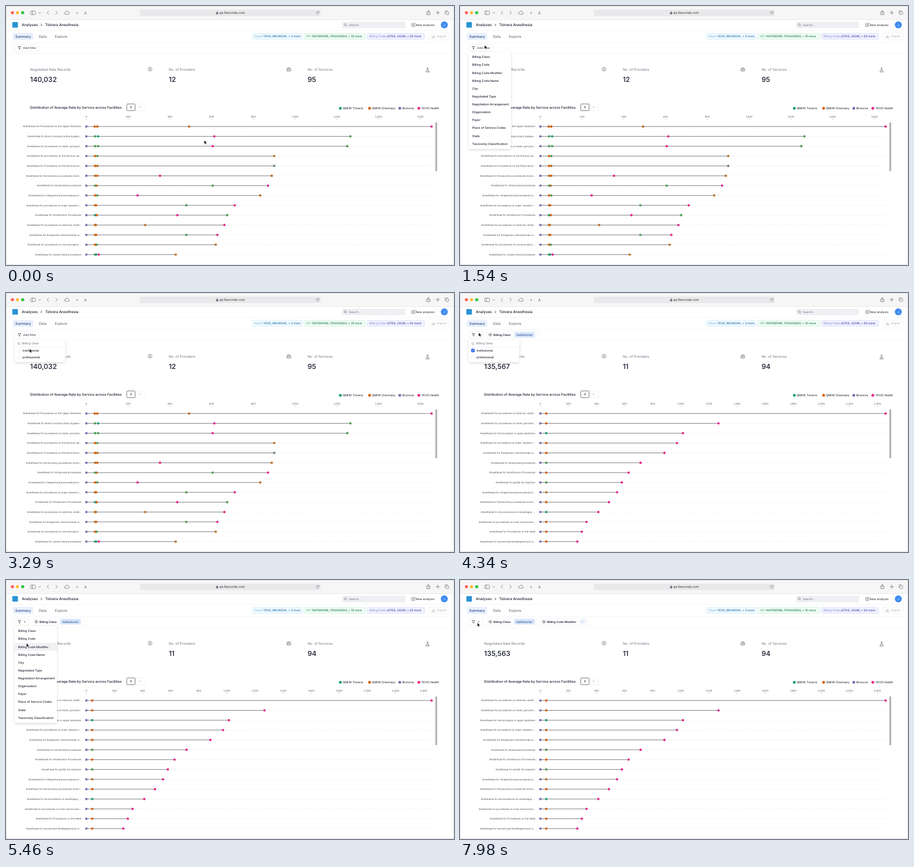
An HTML page for the animation above (8000 ms loop, 800 px wide and 464 px high).

```html
<!DOCTYPE html>
<html lang="en">
<head>
<meta charset="utf-8">
<title>Rate analysis</title>
<style>
html, body { margin: 0; width: 100%; height: 100%; overflow: hidden; background: #eee; }
svg { display: block; width: 800px; height: 464px; font-family: Inter, "Open Sans", sans-serif; text-rendering: geometricPrecision; }
</style>
</head>
<body>
<svg viewBox="0 0 800 464">
  <defs><filter id="shadow" x="-20%" y="-20%" width="140%" height="140%">
    <feDropShadow dx="0" dy="1.5" stdDeviation="2" flood-opacity=".16"/>
  </filter></defs>
  <g id="scene"></g>
  <path id="cursor" d="M0 0V6.8L1.6 5.4L2.7 7.8L3.8 7.3L2.8 5H5Z" fill="#000" stroke="#fff" stroke-width=".5"/>
</svg>
<script>
const LOOP = 8000;
const INK = '#151a2b', GREY = '#6b7280', PALE = '#e9eaee', ICON = '#666b75';
const COLORS = { g: '#1b9e77', o: '#d95f02', p: '#7570b3', k: '#e7298a', b: '#b8722c', l: '#4f9d58', x: '#6f8a78' };

// Drawing helpers; text is centred vertically on y.
const text = (x, y, s, size, fill = INK, weight = 400, anchor = 'start') =>
  `<text x="${x}" y="${y + size * .36}" font-size="${size}" fill="${fill}" font-weight="${weight}" text-anchor="${anchor}">${s}</text>`;
const rect = (x, y, w, h, fill, r = 0, stroke = 'none', extra = '') =>
  `<rect x="${x}" y="${y}" width="${w}" height="${h}" rx="${r}" fill="${fill}" stroke="${stroke}" stroke-width=".7" ${extra}/>`;
const path = (d, stroke = ICON, w = .8, extra = '') =>
  `<path d="${d}" fill="none" stroke="${stroke}" stroke-width="${w}" stroke-linecap="round" stroke-linejoin="round" ${extra}/>`;
const dot = (x, y, r, fill, stroke = 'none') =>
  `<circle cx="${x}" cy="${y}" r="${r}" fill="${fill}" stroke="${stroke}" stroke-width=".7"/>`;

// Each row: label | marks as colour letter + x position.
const parse = rows => rows.map(row => {
  const [label, marks] = row.split('|');
  return { label: 'Anesthesia for ' + label, marks: marks.split(' ').map(m => [m[0], +m.slice(1)]) };
});
const ALL = {
  step: 74.55, ticks: 9,
  rows: parse([
    'Procedures on the Upper Abdomen|o158.5 o163 b327 k760',
    'direct coronary artery bypass...|l159 g164.5 k372 l615',
    'procedures on heart, pericard...|l159 l164.5 k369 l609.5',
    'procedures on the thoracic sp...|o159 l163 b479',
    'Procedures on the Pelvis Exce...|o159 b163 x479',
    'thoracotomy procedures involv...|b159 o163 k275 b474.5',
    'intracranial procedures|l159 b162 l369 k468',
    'intraperitoneal procedures in...|o159 l163 k235 b454',
    'procedures on major vessels o...|b159 o161 l322 k408.5',
    'Intrathoracic Procedures|g159 o162 k306 l395',
    'procedures on external, middl...|o159 b160.5 b248.5 k390',
    'therapeutic interventional ra...|b159 o161 l322 k377.5',
    'procedures on cervical spine ...|o159 l162 b374.5',
    'closed chest procedures|l159 g161 k165.5 b303'])
};
const FILTERED = {
  step: 50.18, ticks: 13,
  rows: parse([
    'procedures on external, middl...|o154 k760',
    'procedures on heart, pericard...|o154 k461.5',
    'hernia repairs in upper abdomen|g154 k398',
    'procedures on major vessels o...|o154 k387.5',
    'therapeutic interventional ra...|o154 k365',
    'intracranial procedures|l154 k322.5',
    'Intrathoracic Procedures|o154 k301',
    'partial rib resection|l154 k289',
    'intraperitoneal procedures in...|b154 k280.5',
    'thoracotomy procedures involv...|o154 k266',
    'all procedures on esophagus, ...|g154 k247',
    'procedures on nose and access...|o154 k226',
    'Procedures on the Head|o154 k217.5',
    'second and thirddegree burn e...|o154 k209.5'])
};
const MENU = ['Billing Class', 'Billing Code', 'Billing Code Modifier', 'Billing Code Name', 'City', 'Negotiated Type',
  'Negotiation Arrangement', 'Organization', 'Payer', 'Place of Service Codes', 'State', 'Taxonomy Classification'];
const MENU_TOP = 84.3, MENU_STEP = 14.13;

function browserBar() {
  return rect(.5, .5, 799, 463, '#fff', 6, '#d4d4d6') +
    '<path d="M.8 24.5V7Q.8.8 7 .8H793Q799.2.8 799.2 7V24.5Z" fill="#f7f6f7"/>' +
    path('M.8 24.5H799.2', '#e4e4e6', .7) +
    dot(11.5, 12, 2.8, '#ff5f57') + dot(20.6, 12, 2.8, '#febc2e') + dot(29.8, 12, 2.8, '#28c840') +
    rect(44, 9, 8.5, 6.5, 'none', 1.3, ICON) + path('M47 9V15.5M58.5 11.5L60.2 13.2L61.9 11.5') +
    path('M76.3 9L73.3 12L76.3 15M88.8 9L91.8 12L88.8 15') +
    path('M106 14.8Q103.8 14.6 104.2 12.6Q104.8 11.2 106.2 11.4Q107 8.8 109.4 9.2Q111.6 9.6 111.8 11.5Q113.4 11.8 113.3 13.3Q113 14.8 111.5 14.8Z') +
    text(127, 12.3, 'A', 4.5, ICON, 500, 'middle') + text(142, 12, 'A', 7, ICON, 400, 'middle') +
    rect(239, 6.5, 323, 11.5, '#e9e8ea', 3) +
    rect(375.2, 11.5, 3.8, 3.3, ICON, .6) + path('M376 11.5V10.5Q377.1 8.7 378.2 10.5V11.5', ICON, .6) +
    text(381, 12.3, 'qa.feecorda.com', 5.7, '#333') +
    path('M558.6 11.2A2.4 2.4 0 1 0 558.8 13M558.8 9.6V11.3H557', ICON, .6) +
    path('M752.8 11H751.4V15.6H757V11H755.6M754.2 13V8.2M752.7 9.6L754.2 8.1L755.7 9.6') +
    path('M768 12H774M771 9V15') +
    rect(785.6, 10.4, 5, 5, 'none', 1, ICON) + path('M784 13.6V9.5Q784 8.6 785 8.6H788.8', ICON, .7);
}

function pill(x, w, label, value, [bg, border, light, dark]) {
  return rect(x, 49, w, 11, bg, 2, border) +
    text(x + 4, 54.5, `<tspan fill="${light}" font-weight="400">${label}</tspan> ${value}`, 5.15, dark, 500);
}

function header() {
  return rect(11.3, 28.8, 10, 10, '#2a93d5', 1.5) +
    text(28.3, 33.8, 'Analyses', 6.5, INK, 500) + path('M62.3 32L64.2 33.9L62.3 35.8', INK) +
    text(70, 33.8, 'Tolvera Anesthesia', 6.5, INK, 500) +
    rect(600, 28, 113, 12, '#eff0f3', 2.5) + dot(605.8, 33.4, 1.8, 'none', ICON) + path('M607.2 34.8L608.6 36.2', ICON, .7) +
    text(612, 34, 'Search...', 5.3, GREY) +
    path('M727 31.4H724.6V36.6H730V34.2M726.8 34.5L727 33.2L730 30.3L731 31.3L728.1 34.2Z', '#444', .6) +
    text(731.5, 34, 'New analysis', 5.4, '#262b3a') +
    dot(782.7, 33.8, 6.2, '#3f8cf0') + text(782.7, 34, 'J', 5.2, '#fff', 400, 'middle') +
    path('M1 43.5H799M1 65.3H799M1 85.5H799', '#f0f1f3', .7) +
    rect(12, 48, 36.5, 13, '#eaf1fc', 2.5) +
    text(16.4, 54.5, 'Summary', 6.2, '#1f3f80', 500) + text(58.8, 54.5, 'Data', 6.3, '#555c69') + text(87.2, 54.5, 'Explore', 6.3, '#555c69') +
    pill(440, 89, 'Payer', 'YEVO, BRUNOVA, + 3 more', ['#f0f9ff', '#d3ebf8', '#6fb3dc', '#2070a6']) +
    pill(532, 110, 'NPI', '1407995186, 1154435824, + 10 more', ['#effbf5', '#cdeedd', '#5db38c', '#13764a']) +
    pill(645, 102.5, 'Billing Code', 'J2704, J2249, + 93 more', ['#eff1fe', '#d8dcf8', '#7e88d6', '#3a3fa5']) +
    rect(755, 48.5, 36.5, 12, '#fff', 2, '#eeeef1') +
    path('M760.6 55V57H766V55M763.3 52V55.3M762 54.2L763.3 55.5L764.6 54.2', '#a6a9b1', .7) +
    text(770, 54.5, 'Export', 5.4, '#a6a9b1');
}

function filterChip(x, w, label) {
  return rect(x, 68.8, w, 12.2, '#fff', 2.5, '#f0f1f4') + dot(x + 6.3, 74.8, 2.4, 'none', '#444') +
    path(`M${x + 5.5} 74L${x + 7.1} 75.6M${x + 7.1} 74L${x + 5.5} 75.6`, '#444', .6) +
    text(x + 12, 74.8, label, 5.2, '#20263a', 600);
}

function filterBar({ chips }) {
  let out = rect(14.5, 68.8, chips ? 26 : 44.5, 12.2, '#fff', 2.5, PALE) +
    path('M21.5 72.5H26.5L24.7 75V77.6L23.3 76.8V75Z', '#444', .7);
  if (!chips) return out + text(30.6, 74.8, 'Add filter', 5.35, '#333947');
  out += path('M32 74.8H35M33.5 73.3V76.3', '#777', .6) + filterChip(47.8, 90, 'Billing Class') +
    rect(97, 70, 36.5, 9.6, '#d6e5fb', 2) + text(100.4, 74.8, 'institutional', 5.25, '#1f3f80');
  if (chips > 1) out += filterChip(143.5, 84, 'Billing Code Modifier') + rect(213.5, 70, 10.5, 9.6, '#eef4fd', 2) + path('M216 74.8H221.5', '#b3c0d6', .6);
  return out;
}

function stats({ figures }) {
  const labels = ['Negotiated Rate Records', 'No. of Providers', 'No. of Services'];
  return labels.map((label, i) => {
    const x = 43 + i * 247.7;
    return text(x, 113.6, label, 6.2, GREY) + text(x, 131.4, figures[i], 12.4, INK, 500);
  }).join('') +
    dot(257.2, 113.2, 3.5, 'none', ICON) + text(257.2, 113.3, '$', 5, ICON, 500, 'middle') +
    dot(505, 111.6, 1.3, 'none', ICON) + dot(502.6, 112, .9, 'none', ICON) + dot(507.4, 112, .9, 'none', ICON) +
    path('M503.2 116.4V114.6Q505 113.2 506.8 114.6V116.4ZM503 116H501.2V114.5L502.4 113.8M507 116H508.8V114.5L507.6 113.8', ICON, .7) +
    path('M751.8 111.2H753.8M752.2 111.2V114L749.6 117.6Q749.4 118.4 750.3 118.4H755.4Q756.3 118.4 756 117.6L753.4 114V111.2M750.6 116.4H755', ICON, .7);
}

function chart({ data }) {
  const legend = [[597, 'g', 'QMHK Tolvera'], [649.3, 'o', 'QMHK Drennasy'], [703.2, 'p', 'Brunova'], [737.2, 'k', 'YEVO Health']];
  let out = text(43, 181.5, 'Distribution of Average Rate by Service across Facilities', 6.15, INK, 500) +
    rect(230.5, 175.5, 17, 12, '#fff', 1.5, '#f0f0f2') + rect(215.7, 175.5, 14.8, 12, '#fff', 1, '#444') +
    text(223.1, 181.5, '$', 5, INK, 400, 'middle') + text(238.8, 181.5, '%', 4.6, '#aaa', 400, 'middle');
  for (const [x, color, label] of legend) out += dot(x, 183.2, 2.5, COLORS[color]) + text(x + 4.2, 183.2, label, 5.3);
  for (let i = 0; i < data.ticks; i++) {
    const x = 143.5 + i * data.step;
    out += text(x, 198, (i * 200).toLocaleString('en-US'), 4.6, '#555', 400, 'middle') + path(`M${x} 202V203.6`, '#999', .5);
  }
  data.rows.forEach(({ label, marks }, i) => {
    const y = 215.9 + i * 17.65, end = marks[marks.length - 1][1];
    out += text(134.5, y, label, 4.38, '#444', 400, 'end') +
      path(`M143.5 ${y}H760`, '#dcdcdf', .5, 'stroke-dasharray=".5 1.8"') + path(`M143.5 ${y}H${end}`, '#70737a', .9);
    for (const [color, x] of [['p', 143.5], ...marks]) out += dot(x, y, 2.15, COLORS[color]);
  });
  return out + rect(766.6, 208.5, 3.4, 87.5, '#b4b4b6', 1);
}

const panel = (w, top, bottom) => rect(15.5, top, w, bottom - top, '#fff', 2, 'none', 'filter="url(#shadow)"');

function menu(hover) {
  return panel(75.5, 82.8, 256) + MENU.map((item, i) => {
    const y = MENU_TOP + i * MENU_STEP;
    return (i === hover ? rect(15.5, y, 75.5, MENU_STEP, '#f1f1f3') : '') + text(21.8, y + 7, item, 5.42, '#1e2433', 500);
  }).join('');
}

function options(title, items, checked) {
  return panel(90.5, 84.5, 97 + items.length * 12.6 + 1.5) + dot(22.8, 90.2, 1.8, 'none', '#8b8f99') +
    path('M24.2 91.6L25.5 92.9', '#8b8f99', .7) + text(28.8, 90.6, title, 5.27, GREY) + path('M16 97H106', PALE, .6) +
    items.map((item, i) => {
      const y = 103 + i * 12.3, on = checked && i === 0;
      return rect(20.3, y - 2.8, 5.6, 5.6, on ? '#2563eb' : '#fff', 1, on ? '#2563eb' : '#e6e8ed') +
        (on ? path(`M21.6 ${y}L22.7 ${y + 1.2}L24.6 ${y - 1.2}`, '#fff') : '') +
        text(29.5, y + .2, item, 5.25, '#1e2433', 500);
    }).join('');
}

function dropdown({ open, hover, chips }) {
  if (open === 'menu') return menu(hover);
  if (open === 'class') return options('Billing Class', ['institutional', 'professional'], chips > 0);
  if (open === 'modifier') return options('Billing Code Modifier', ['', '26', 'TC'], chips > 1);
  return '';
}

// Timelines: [start time, value]; the latest started entry applies.
const OPEN = [[0, ''], [1540, 'menu'], [2450, 'class'], [4480, ''], [4830, 'menu'], [5740, 'modifier'], [7980, '']];
const CHIPS = [[0, 0], [3500, 1], [7140, 2]];
const DATA = [[0, ALL], [3920, FILTERED]];
const FIGURES = [[0, ['140,032', '12', '95']], [3920, ['135,567', '11', '94']], [7420, ['135,563', '11', '94']]];
const at = (line, t) => line.filter(([start]) => start <= t).pop()[1];

// Cursor moves: start, end, target x, target y.
const MOVES = [[0, 1190, 44, 70], [1750, 2310, 36, 90], [2660, 3290, 42, 100], [3850, 4340, 33.5, 71], [4900, 5460, 36.5, 113.3],
  [5950, 6790, 28.3, 103], [7280, 7840, 31, 76.5]];

function cursorAt(t) {
  let x = 354, y = 240.5;
  for (const [start, end, tx, ty] of MOVES) {
    const p = Math.min(1, Math.max(0, (t - start) / (end - start))), e = p * p * (3 - 2 * p);
    x += (tx - x) * e;
    y += (ty - y) * e;
  }
  return [x, y];
}

const scene = document.getElementById('scene'), cursor = document.getElementById('cursor');
let shown = '';

function frame() {
  const t = (performance.now() + 4) % LOOP;
  const [x, y] = cursorAt(t);
  const state = { open: at(OPEN, t), chips: at(CHIPS, t), data: at(DATA, t), figures: at(FIGURES, t) };
  state.hover = state.open === 'menu' ? Math.floor((y + 1 - MENU_TOP) / MENU_STEP) : -1;
  const key = [state.open, state.chips, state.data.ticks, state.figures, state.hover].join();
  if (key !== shown) {
    scene.innerHTML = browserBar() + header() + filterBar(state) + stats(state) + chart(state) + dropdown(state);
    shown = key;
  }
  cursor.setAttribute('transform', `translate(${x} ${y})`);
  requestAnimationFrame(frame);
}
frame();
</script>
</body>
</html>
```
